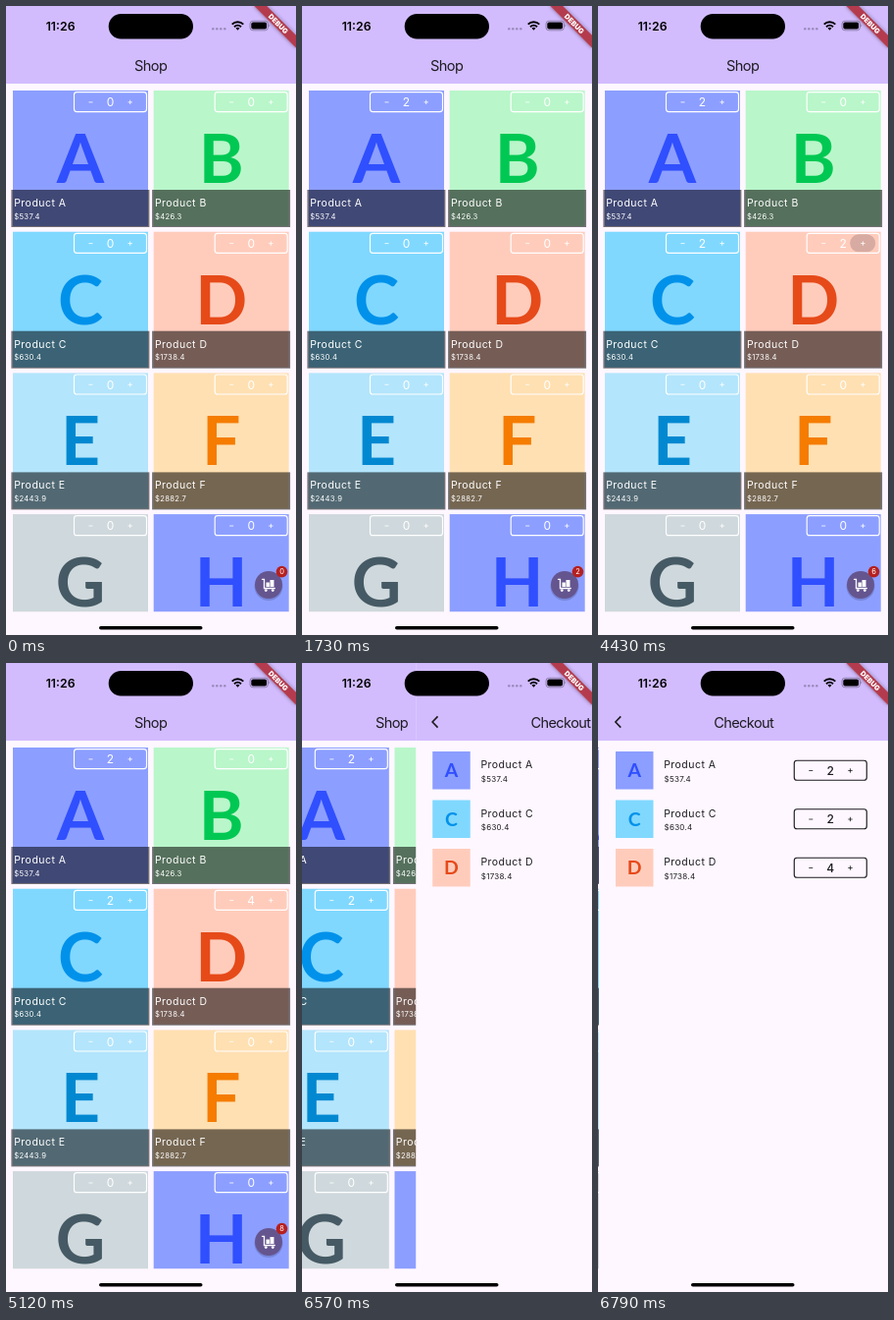
An HTML page that plays this animation: 296 by 640 pixels, repeating every 8000 ms.

```html
<!DOCTYPE html>
<html lang="en">
<head>
<meta charset="utf-8">
<title>Shop</title>
<style>
  html, body { margin: 0; width: 100%; height: 100%; overflow: hidden; background: #fef7ff; }
  svg { display: block; width: 296px; height: 640px; }
  text { font-family: Inter, sans-serif; }
  .letter { font: 700 69.7px Lato, sans-serif; text-anchor: middle; }
  .title { font-size: 14.6px; letter-spacing: -.62px; text-anchor: middle; fill: #1d1b20; }
  .name { font-size: 10.5px; letter-spacing: .47px; }
  .price { font-size: 7.7px; letter-spacing: .28px; }
  .row .price { font-size: 8px; }
  .count { font-size: 12px; text-anchor: middle; }
  .row .count { font-weight: 500; }
  .clock { font-size: 12.3px; font-weight: 600; text-anchor: middle; }
  .debug { font-size: 7.2px; font-weight: 900; text-anchor: middle; fill: #fff; }
  .badge { font-size: 7.5px; text-anchor: middle; fill: #fff; }
</style>
</head>
<body>
<svg id="stage" viewBox="0 0 296 640"></svg>
<script>
const LOOP = 8000;
const products = [
  ['A', '$537.4', '#8c9eff', '#304ffe'],
  ['B', '$426.3', '#b9f6ca', '#00c853'],
  ['C', '$630.4', '#80d8ff', '#0091ea'],
  ['D', '$1738.4', '#ffccbc', '#e64a19'],
  ['E', '$2443.9', '#b3e5fc', '#0288d1'],
  ['F', '$2882.7', '#ffe0b2', '#f57c00'],
  ['G', '', '#cfd8dc', '#455a64'],
  ['H', '', '#8c9eff', '#304ffe'],
].map(([id, price, back, ink]) => ({ id, price, back, ink }));

// Moments at which a tap on "+" raises the count
const taps = { A: [1170, 1510], C: [2860, 3080], D: [4200, 4430, 4680, 4900] };
const PRESS = 110, FADE = 220;

const picture = p => `
  <rect width="138" height="138" fill="${p.back}"/>
  <text class="letter" x="69" y="94" fill="${p.ink}">${p.id}</text>`;

const counter = (p, color, x, y) => `
  <g transform="translate(${x} ${y})">
    <rect id="splash${color === '#fff' ? p.id : ''}" x="44" y="1" width="26" height="18" rx="9" fill="#5a4650" opacity="0"/>
    <rect width="74" height="20" rx="2.8" fill="none" stroke="${color}" stroke-width="1.15"/>
    <path d="M15 10.3h4M55 10.3h4.4M57.2 8.1v4.4" stroke="${color}" stroke-width=".8"/>
    <text class="count" data-id="${p.id}" x="37" y="14.6" fill="${color}">0</text>
  </g>`;

const tile = (p, i) => `
  <g transform="translate(${7 + (i % 2) * 143.7} ${86 + (i >> 1) * 143.7})">
    ${picture(p)}
    <rect x="-1.6" y="101" width="141" height="38" fill="#000" opacity=".54"/>
    <g fill="#fff">
      <text class="name" x="1.2" y="118">Product ${p.id}</text>
      <text class="price" x="1.3" y="130.7">${p.price}</text>
    </g>
    ${counter(p, '#fff', 62.5, 1.6)}
  </g>`;

const row = (p, i) => `
  <g class="row" transform="translate(0 ${90 + i * 49.5})">
    <g transform="translate(17 0) scale(.279)">${picture(p)}</g>
    <g fill="#1d1b20">
      <text class="name" x="66.2" y="17">Product ${p.id}</text>
      <text class="price" x="66.5" y="30.5">${p.price}</text>
    </g>
    ${counter(p, '#1d1b20', 199.3, 9.2)}
  </g>`;

const page = (id, title, content) => `
  <g id="${id}">
    <rect width="296" height="640" fill="#fef7ff"/>
    <rect width="296" height="79" fill="#d2bcfe"/>
    <text class="title" x="147.7" y="65.5">${title}</text>
    ${content}
  </g>`;

const cartButton = `
  <circle cx="268" cy="590.5" r="14.5" fill="#000" opacity=".15"/>
  <circle cx="268" cy="589" r="14" fill="#65558f"/>
  <g fill="none" stroke="#fff" stroke-width="1.3" stroke-linecap="round">
    <path d="M261.5 583.3h2v9.2h10.8"/>
  </g>
  <path d="M265.5 586.5h3.4v4.4h-3.4zM269.5 584h4v6.9h-4z" fill="#fff"/>
  <circle cx="265.3" cy="594.6" r="1.4" fill="#fff"/>
  <circle cx="272.3" cy="594.6" r="1.4" fill="#fff"/>
  <circle cx="281.5" cy="575.6" r="5.8" fill="#b5201f"/>
  <text class="badge" id="total" x="281.5" y="578.3">0</text>`;

const systemOverlay = `
  <text class="clock" x="55.6" y="24.6">11:26</text>
  <rect x="104.7" y="8" width="86.3" height="25.4" rx="12.7"/>
  <g opacity=".25">${[0, 1, 2, 3].map(i =>
    `<circle cx="${211.3 + i * 4}" cy="23.3" r="1.3"/>`).join('')}</g>
  <path d="M230.7 18.7a8.2 8.2 0 0 1 11.6 0M233 21.2a5 5 0 0 1 7 0" fill="none" stroke="#000" stroke-width="1.9"/>
  <path d="M236.5 24.8l-2-2.2a2.9 2.9 0 0 1 4 0z"/>
  <rect x="249" y="15.2" width="18.4" height="9.6" rx="3" fill="none" stroke="#000" stroke-opacity=".4" stroke-width=".8"/>
  <rect x="250.3" y="16.5" width="15.8" height="7" rx="1.9"/>
  <path d="M268.5 18.4q1.5 1.6 0 3.2z" opacity=".45"/>
  <g transform="translate(296 0) rotate(45)">
    <rect x="-30" y="21" width="60" height="9.2" fill="#b02a35" opacity=".88" style="filter:drop-shadow(0 0 2px #0006)"/>
    <text class="debug" y="28.2">DEBUG</text>
  </g>
  <rect x="95" y="631" width="105.5" height="3.6" rx="1.8"/>`;

const stage = document.getElementById('stage');
stage.innerHTML = `
  <clipPath id="body"><path d="M0 79h296v537.3H0z"/></clipPath>
  ${page('shop', 'Shop', `<g clip-path="url(#body)">${products.map(tile).join('')}</g>${cartButton}`)}
  ${page('checkout', 'Checkout', `
    <path d="M22.3 54.4l-5.4 5.6 5.4 5.6" fill="none" stroke="#1d1b20" stroke-width="1.6"/>
    ${products.filter(p => taps[p.id]).map(row).join('')}`)}
  ${systemOverlay}`;

const find = id => document.getElementById(id);
const moveX = (id, x) => find(id).setAttribute('transform', `translate(${x} 0)`);
const countLabels = [...stage.querySelectorAll('.count')];

function splashStrength(times, t) {
  return Math.max(...times.map(tap => {
    if (t < tap - PRESS || t > tap + FADE) return 0;
    return t <= tap ? 1 : 1 - (t - tap) / FADE;
  }));
}

// The screen refreshes every 110 ms while the page slides in
function slideProgress(t) {
  const tick = Math.min(6460 + 110 * Math.floor((t - 6460) / 110), 6790);
  return tick < 6527 ? 0 : 1 - Math.exp((6527 - tick) / 46);
}

function draw(t) {
  const countOf = id => (taps[id] || []).filter(tap => t >= tap).length;
  for (const label of countLabels) label.textContent = countOf(label.dataset.id);
  find('total').textContent = Object.keys(taps).reduce((sum, id) => sum + countOf(id), 0);
  for (const id in taps)
    find('splash' + id).setAttribute('opacity', .24 * splashStrength(taps[id], t));

  const progress = slideProgress(t);
  moveX('shop', -98.7 * progress ** 1.13);
  moveX('checkout', 296 * (1 - progress));
}

const start = performance.now();
function tick() {
  draw((performance.now() - start) % LOOP);
  requestAnimationFrame(tick);
}
tick();
</script>
</body>
</html>
```
